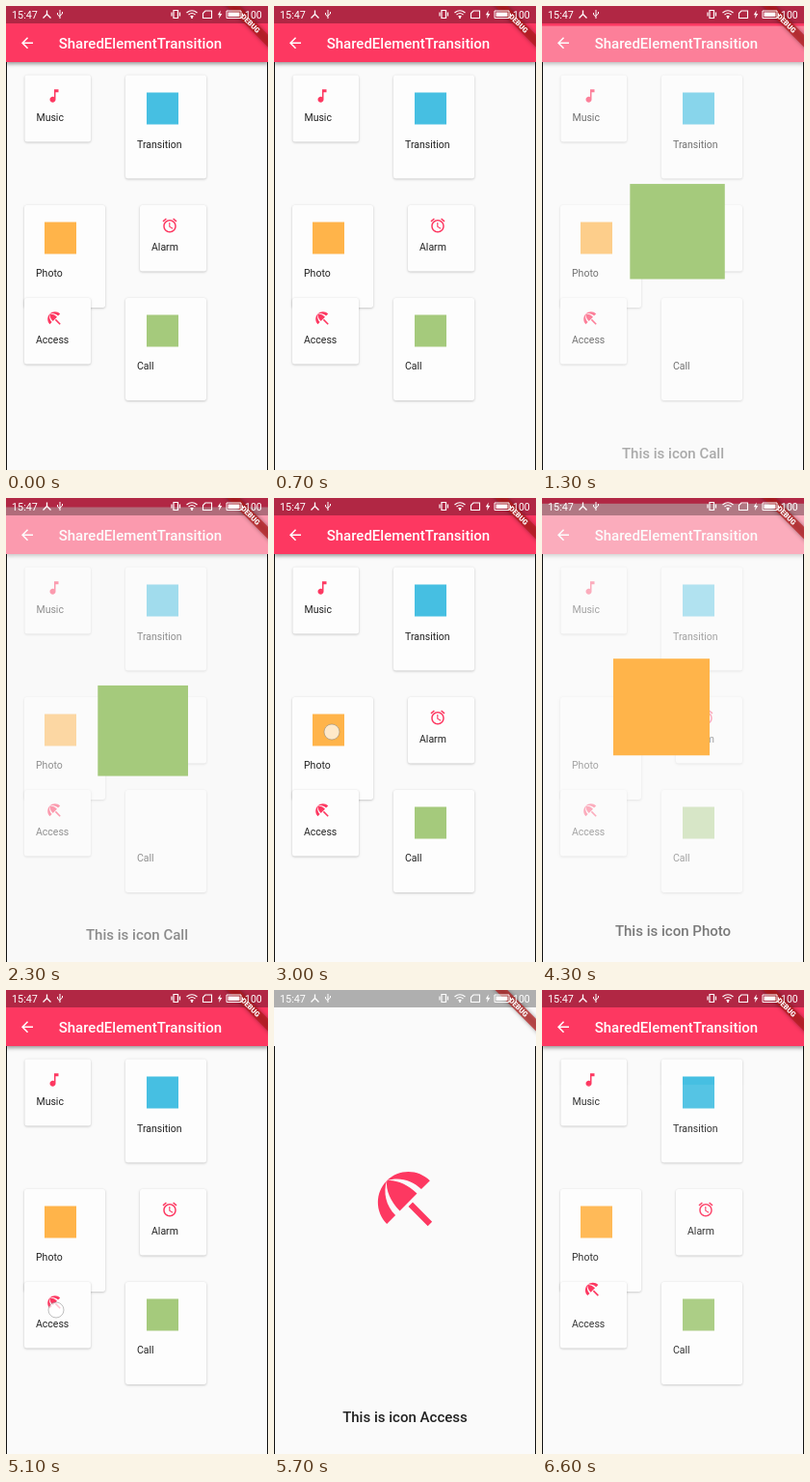
Write an HTML page with a canvas that moves like this. It is 272 px wide and 480 px high and loops after 6700 ms.

```html
<!DOCTYPE html>
<html lang="en">
<head>
<meta charset="utf-8">
<title>Shared element transition</title>
<style>
html, body { margin: 0; width: 100%; height: 100%; overflow: hidden; background: #fafafa; }
canvas { display: block; width: 272px; height: 480px; }
</style>
</head>
<body>
<canvas id="stage"></canvas>
<script>
const W = 272, H = 480, LOOP = 6700, STEP = 100, FLIGHT = 300;
const STATUS_H = 18, BAR_BOTTOM = 58;
const PINK = '#fd3861', PAPER = '#fafafa', INK = '#212121';

const canvas = document.getElementById('stage');
const ctx = canvas.getContext('2d');
const ratio = window.devicePixelRatio || 1;
canvas.width = W * ratio;
canvas.height = H * ratio;

const glyphs = {
  back: 'M20 11H7.83l5.59-5.59L12 4l-8 8 8 8 1.41-1.41L7.83 13H20z',
  music: 'M12 3v10.55c-.59-.34-1.27-.55-2-.55-2.21 0-4 1.79-4 4s1.79 4 4 4 4-1.79 4-4V7h4V3z',
  alarm: 'M22 5.72l-4.6-3.86-1.29 1.53 4.6 3.86zM7.88 3.39L6.6 1.86 2 5.71l1.29 1.53zM12.5 8H11v6l4.75 2.85.75-1.23-4-2.37zM12 4c-4.97 0-9 4.03-9 9s4.02 9 9 9 9-4.03 9-9-4.03-9-9-9zm0 16c-3.87 0-7-3.13-7-7s3.13-7 7-7 7 3.13 7 7-3.13 7-7 7z',
  umbrella: 'M13.13 14.56l1.43-1.43L21 19.57 19.57 21zM17.42 8.83l2.86-2.86c-3.95-3.95-10.35-3.96-14.3-.02 3.93-1.3 8.31-.25 11.44 2.88zM5.95 5.98c-3.94 3.95-3.93 10.35.02 14.3l2.86-2.86C5.7 14.29 4.65 9.91 5.95 5.98zM5.97 5.96l-.01.01c-.38 3.01 1.17 6.88 4.3 10.02l5.73-5.73c-3.13-3.13-7.01-4.68-10.02-4.3z'
};
for (const name in glyphs) glyphs[name] = new Path2D(glyphs[name]);

// Each card: box [x, y, w, h], icon centre, label baseline, and a glyph or a plain square.
const music = { label: 'Music', box: [19.5, 71.5, 68.5, 69], icon: [50, 93], base: 119, glyph: 'music' };
const transition = { label: 'Transition', box: [124, 71.5, 84, 107], icon: [162.5, 106], base: 146.5, color: '#46bfe2' };
const photo = { label: 'Photo', box: [19, 206, 84, 106], icon: [56.5, 240], base: 279.5, color: '#ffb44a' };
const alarm = { label: 'Alarm', box: [139, 206, 69, 68.5], icon: [170, 227], base: 253, glyph: 'alarm' };
const access = { label: 'Access', box: [19, 302, 69, 68.5], icon: [50, 323], base: 348.5, glyph: 'umbrella', arc: [0.06, 0.6] };
const call = { label: 'Call', box: [124, 302, 84, 106], icon: [162.5, 336], base: 375.5, color: '#a5ca7c' };
const cards = [music, transition, photo, alarm, access, call];

const visits = [
  { card: call, touch: [163, 340], tap: 1100, open: 1136, close: 2200 },
  { card: photo, touch: [60, 242], tap: 3000, open: 3036, close: 4219 },
  { card: access, touch: [52, 331], tap: 5100, open: 5150, close: 6368 }
];

const clamp = v => Math.min(1, Math.max(0, v));
const mix = (a, b, k) => a + (b - a) * k;

function bezier(x1, y1, x2, y2) {
  const at = (a, b, s) => 3 * (1 - s) * (1 - s) * s * a + 3 * (1 - s) * s * s * b + s * s * s;
  return x => {
    if (x <= 0 || x >= 1) return clamp(x);
    let low = 0, high = 1;
    for (let i = 0; i < 22; i++) {
      const mid = (low + high) / 2;
      if (at(x1, x2, mid) < x) low = mid; else high = mid;
    }
    return at(y1, y2, low);
  };
}
const fastOutSlowIn = bezier(0.4, 0, 0.2, 1);
const easeIn = bezier(0.42, 0, 1, 1);
const easeInOut = bezier(0.42, 0, 0.58, 1);

function rect(x, y, w, h, color) {
  ctx.fillStyle = color;
  ctx.fillRect(x, y, w, h);
}

function text(str, x, y, size, color, weight = 400, align = 'left') {
  ctx.font = `${weight} ${size}px Roboto, sans-serif`;
  ctx.textAlign = align;
  ctx.fillStyle = color;
  ctx.fillText(str, x, y);
}

function glyph(name, x, y, size, color) {
  ctx.save();
  ctx.translate(x, y);
  ctx.scale(size / 24, size / 24);
  ctx.translate(-12, -12);
  ctx.fillStyle = color;
  ctx.fill(glyphs[name], 'evenodd');
  ctx.restore();
}

function shadow(color, blur, dy) {
  ctx.shadowColor = color;
  ctx.shadowBlur = blur * ratio;
  ctx.shadowOffsetY = dy * ratio;
}

function drawIcon(card, x, y, grow) {
  if (card.glyph) return glyph(card.glyph, x, y, mix(18, 75, grow), PINK);
  const side = mix(33, 112, grow);
  rect(x - side / 2, y - side / 2, side, side, card.color);
}

function drawCard(card, hideIcon) {
  const [x, y, w, h] = card.box;
  ctx.save();
  shadow('rgba(0,0,0,.24)', 2.5, 0.8);
  ctx.fillStyle = '#fdfdfd';
  ctx.beginPath();
  ctx.roundRect(x, y, w, h, 2.5);
  ctx.fill();
  ctx.restore();
  if (!hideIcon) drawIcon(card, ...card.icon, 0);
  text(card.label, x + 12, card.base, 10.5, INK);
}

function drawHome(awayCard) {
  rect(0, 0, W, H, PAPER);
  for (const card of cards) drawCard(card, card === awayCard);
  ctx.save();
  shadow('rgba(0,0,0,.4)', 4, 1.5);
  rect(0, 0, W, BAR_BOTTOM, PINK);
  ctx.restore();
  glyph('back', 22, 38.3, 18, '#fff');
  text('SharedElementTransition', 54.7, 43.6, 15, '#fff', 500);
}

function drawDetail(card, t) {
  ctx.save();
  ctx.globalAlpha = easeIn(t);
  ctx.translate(0, (1 - fastOutSlowIn(t)) * H / 4);
  rect(0, 0, W, H, PAPER);
  text('This is icon ' + card.label, 136, 447.4, 15, INK, 500, 'center');
  ctx.restore();
}

function drawHero(card, p) {
  const [x, y] = card.icon;
  const [ax, ay] = card.arc || [0.5, 0.5];
  const along = a => 2 * p * (1 - p) * a + p * p;
  drawIcon(card, mix(x, 136, along(ax)), mix(y, card.glyph ? 216 : 212, along(ay)), card.arc ? p * p : p);
}

function drawTouch([x, y]) {
  ctx.beginPath();
  ctx.arc(x, y, 8, 0, 7);
  ctx.fillStyle = 'rgba(255,255,255,.7)';
  ctx.fill();
  ctx.strokeStyle = 'rgba(120,120,120,.6)';
  ctx.lineWidth = 0.8;
  ctx.stroke();
}

function drawBanner() {
  ctx.save();
  ctx.translate(W, 0);
  ctx.rotate(Math.PI / 4);
  ctx.save();
  shadow('rgba(0,0,0,.5)', 4, 0);
  rect(-36, 21, 72, 9, 'rgba(183,28,28,.7)');
  ctx.restore();
  text('DEBUG', 0, 28.2, 7.5, '#fff', 900, 'center');
  ctx.restore();
}

function stroke(path, width = 1) {
  ctx.lineWidth = width;
  ctx.stroke(new Path2D(path));
}

function drawStatus() {
  rect(0, 0, W, STATUS_H, 'rgba(0,0,0,.3)');
  drawBanner();
  ctx.strokeStyle = '#fff';
  text('15:47', 6, 12.6, 10.8, '#fff');
  stroke('M42.5 4.5V8.5L38.5 12.5M42.5 8.5L46.5 12.5', 1.3);
  stroke('M56 4V13M53.5 7V9L56 11M58.5 6V8L56 10', 1);
  stroke('M174 4.5H178.5V12.5H174ZM172 6.5V10.5M180.5 6.5V10.5', 1.2);
  stroke('M187.5 7Q193 2.5 198.5 7M189.5 9Q193 6 196.5 9M191.5 11Q193 9.8 194.5 11', 1.2);
  rect(192.2, 11, 1.6, 2, '#fff');
  stroke('M207 5H213.5V12.5H204.5V7.5Z', 1.1);
  ctx.fillStyle = '#fff';
  ctx.fill(new Path2D('M222.7 4.5L219.8 9.2H221.7L221 13L224.3 8H222.3Z'));
  stroke('M229 5H244V12.5H229ZM245.5 7.5V10', 1);
  rect(230.5, 6.5, 12, 4.5, '#fff');
  text('100', 248, 12.6, 10.5, '#fff');
}

function drawEdges() {
  for (const x of [0, W - 1]) rect(x, BAR_BOTTOM, 1, H, '#111');
}

function progress({ open, close }, now) {
  return now < close ? clamp((now - open) / FLIGHT) : clamp(1 - (now - close) / FLIGHT);
}

function draw(now) {
  ctx.setTransform(ratio, 0, 0, ratio, 0, 0);
  const visit = visits.find(v => now >= v.tap && now < v.close + FLIGHT);
  const t = visit ? progress(visit, now) : 0;
  drawHome(t > 0 ? visit.card : null);
  if (t > 0) {
    drawDetail(visit.card, t);
    drawHero(visit.card, (now < visit.close ? fastOutSlowIn : easeInOut)(t));
  }
  drawStatus();
  if (visit && now < visit.tap + STEP) drawTouch(visit.touch);
  drawEdges();
}

const start = performance.now();
function tick() {
  const now = (performance.now() - start) % LOOP;
  draw(Math.floor(now / STEP) * STEP);
  requestAnimationFrame(tick);
}
tick();
</script>
</body>
</html>
```
